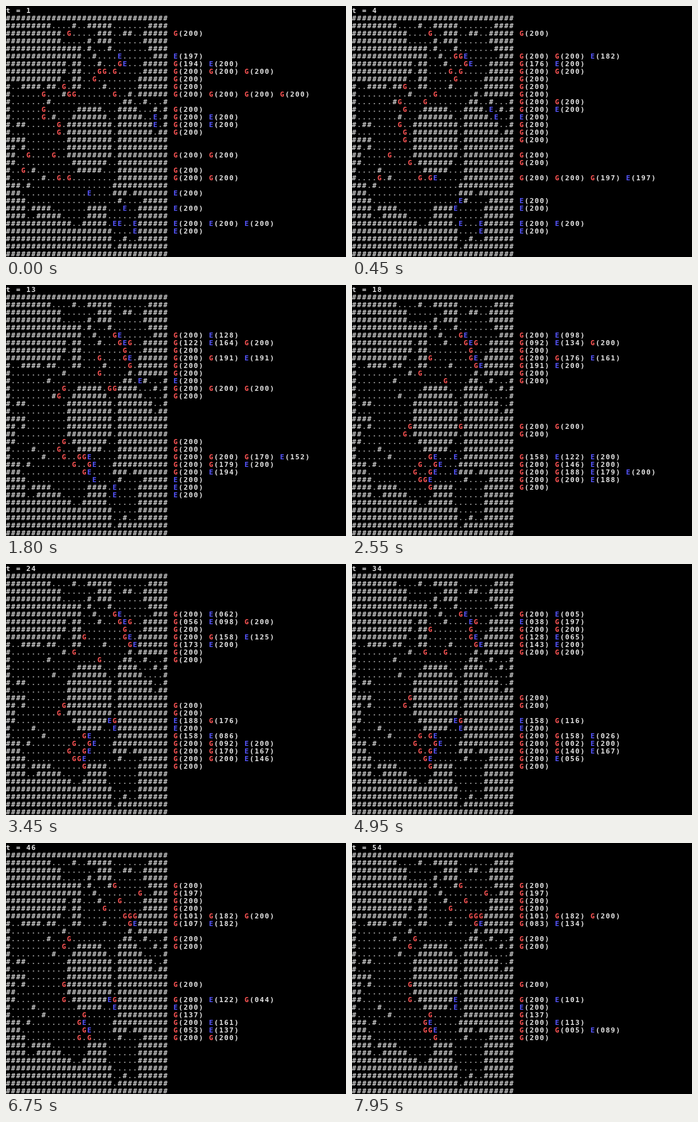
Recreate the animation shown at these times as an HTML page. Size 536 px wide and 396 px high, loop 8 s.

```html
<!DOCTYPE html>
<html lang="en">
<head>
<meta charset="utf-8">
<title>Goblins and elves</title>
<style>
html, body { margin: 0; width: 100%; height: 100%; overflow: hidden; background: #000; }
#screen {
  box-sizing: border-box; width: 100%; height: 100%; overflow: hidden;
  margin: 0; padding-top: 2px;
  font: bold 11px/12px "DejaVu Sans Mono", monospace;
  letter-spacing: calc(8px - 1ch);
  font-variant-ligatures: none;
  color: #e5e5e5; white-space: pre;
}
.wall { color: #ccc; }
.floor { color: #999; }
.G { color: #f55; }
.E { color: #55f; }
</style>
</head>
<body>
<pre id="screen"></pre>
<script>
const START = `
################################
#########....#..#####.......####
###########.G.....###..##..#####
###########.....#.###......#####
###############.#...#.......####
###############..#....E......###
############.##...#...GE...#####
############.##...GG.G.....#####
###########..##..G........######
#..####.##.G.##....#......######
#......G...#GG.......G..#.######
#.......#..............##..#...#
#......G......#####...####...#.#
#......G.#...#######..#####..E.#
#.##......G.#########.#######E.#
#.........G.#########.#######.##
####........#########.##########
##.#........#########.##########
##..G....G..#########.##########
##...........#######..##########
#..G.#........#####...##########
#......#..G.G.........##########
###.#................###########
###.............E....###.#######
####..................#....#####
####.####.......####...E..######
####..#####.....####......######
#############..#####.EE..E######
#####################....E######
#####################..#..######
#####################.##########
################################`.trim().split("\n");

const W = 32, TURNS = 54, TURN_MS = 150, LOOP_MS = 8000, HIT = 3;
const NEAR = [-W, -1, 1, W]; // reading order
const cells = START.join("");
const at = new Map(); // position -> unit

[...cells].forEach((kind, pos) => {
  if (kind === "G" || kind === "E") at.set(pos, { kind, pos, hp: 200 });
});
at.get(5 * W + 22).hp = 197;
at.get(6 * W + 22).hp = 194;

const around = pos => NEAR.map(d => pos + d);
const isFree = pos => cells[pos] !== "#" && !at.has(pos);
const inOrder = () => [...at.values()].sort((a, b) => a.pos - b.pos);

function distances(from) {
  const dist = new Map([[from, 0]]);
  for (const pos of dist.keys()) {
    for (const next of around(pos)) {
      if (isFree(next) && !dist.has(next)) dist.set(next, dist.get(pos) + 1);
    }
  }
  return dist;
}

// Closest candidate; ties go to the first in reading order.
function closest(list, dist) {
  return list.filter(p => dist.has(p))
    .sort((a, b) => dist.get(a) - dist.get(b) || a - b)[0];
}

function foesNear(unit) {
  return around(unit.pos).map(p => at.get(p)).filter(u => u && u.kind !== unit.kind);
}

function move(unit) {
  const goals = inOrder().filter(u => u.kind !== unit.kind)
    .flatMap(u => around(u.pos)).filter(isFree);
  const goal = closest(goals, distances(unit.pos));
  if (goal === undefined) return;
  const step = closest(around(unit.pos).filter(isFree), distances(goal));
  at.delete(unit.pos);
  unit.pos = step;
  at.set(step, unit);
}

function attack(unit) {
  const foe = foesNear(unit).sort((a, b) => a.hp - b.hp || a.pos - b.pos)[0];
  if (!foe) return;
  foe.hp -= HIT;
  if (foe.hp <= 0) at.delete(foe.pos);
}

function playTurn() {
  for (const unit of inOrder()) {
    if (unit.hp <= 0) continue;
    if (!foesNear(unit).length) move(unit);
    attack(unit);
  }
}

const span = (name, text) => `<span class="${name}">${text}</span>`;

function drawRow(y) {
  let map = "", stats = "";
  for (let pos = y * W; pos < (y + 1) * W; pos++) {
    const unit = at.get(pos);
    if (unit) {
      const letter = span(unit.kind, unit.kind);
      map += letter;
      stats += ` ${letter}(${String(unit.hp).padStart(3, "0")})`;
    } else {
      map += cells[pos] === "#" ? span("wall", "#") : span("floor", ".");
    }
  }
  return map + stats;
}

const pages = [];
for (let t = 1; t <= TURNS; t++) {
  if (t > 1) playTurn();
  pages.push([`t = ${t}`, ...START.map((_, y) => drawRow(y))].join("\n"));
}

const screen = document.getElementById("screen");
const begin = performance.now();
let shown = -1;

function show(now) {
  const time = Math.max(0, now - begin) % LOOP_MS;
  const turn = Math.min(TURNS - 1, Math.floor(time / TURN_MS));
  if (turn !== shown) screen.innerHTML = pages[shown = turn];
  requestAnimationFrame(show);
}
show(begin);
</script>
</body>
</html>
```
